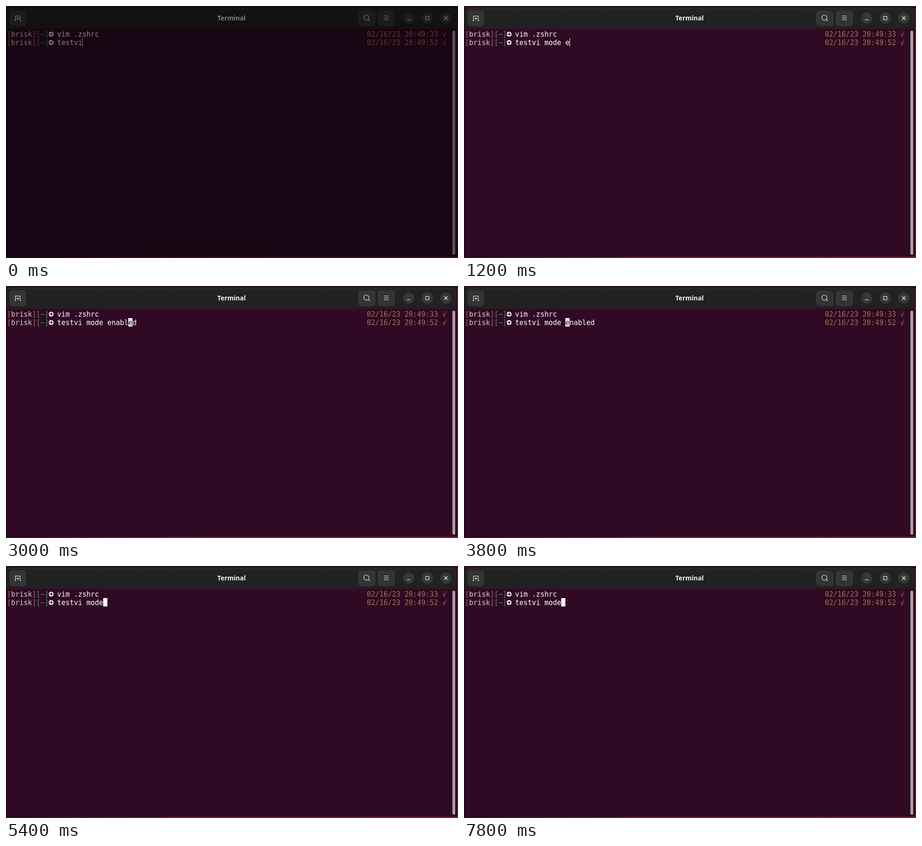
Animation of 972 by 542 pixels, one loop 8000 ms. Source, as an HTML page:

```html
<!DOCTYPE html>
<html lang="en">
<head>
<meta charset="utf-8">
<title>Terminal</title>
<style>
  html, body { margin: 0; width: 100%; height: 100%; overflow: hidden; background: #2c0a22; }
  svg { display: block; }
  .mono { font: 15px "DejaVu Sans Mono", monospace; letter-spacing: -0.03px; white-space: pre; }
  .title { font: bold 13.9px "Noto Sans", sans-serif; text-anchor: middle; }
  .button { fill: #343434; stroke: #3f3f3f; }
  .icon { fill: none; stroke: #f2f2f2; stroke-width: 1.1; }
  .path { fill: #26a269; }
  .user { fill: #d0cfcc; }
  .dim { fill: #a2734c; }
</style>
</head>
<body>
<svg width="972" height="542" viewBox="0 0 972 542">
  <defs>
    <linearGradient id="desk">
      <stop offset="0" stop-color="#3a0d30"/>
      <stop offset=".45" stop-color="#6a203f"/>
      <stop offset="1" stop-color="#7a2040"/>
    </linearGradient>
    <linearGradient id="bar" x2="0" y2="1">
      <stop offset="0" stop-color="#272727"/>
      <stop offset=".2" stop-color="#222"/>
      <stop offset="1" stop-color="#212121"/>
    </linearGradient>
    <g id="prompt">
      <text class="mono dim" x="2" y="66">[<tspan class="user">brisk</tspan>]<tspan class="path">[~]</tspan></text>
      <circle cx="97" cy="60.5" r="5.2" fill="#fff"/>
      <path d="M92.5 60.5H99M96.6 57.7L99.4 60.5L96.6 63.3" fill="none" stroke="#300a24" stroke-width="1.7"/>
    </g>
  </defs>

  <rect width="972" height="542" fill="url(#desk)"/>
  <rect width="972" height="6" fill="#350b2c"/>
  <path d="M0 539V12Q0 2 10 2H960Q970.5 2 970.5 12V539Z" fill="#12060f"/>
  <path d="M1 49V12Q1 3 10 3H960Q969.5 3 969.5 12V49Z" fill="url(#bar)"/>
  <path d="M10 3.5H960" stroke="#343434"/>
  <rect x="1" y="49" width="969" height="489" fill="#300a24"/>
  <rect x="960" y="53" width="6" height="482" rx="3" fill="#aaa1a7"/>

  <text class="title" x="485" y="31" fill="#f4f4f4">Terminal</text>

  <g class="button">
    <rect x="8.5" y="10.5" width="34" height="32" rx="5"/>
    <rect x="758.5" y="10.5" width="35" height="32" rx="5"/>
    <rect x="800.5" y="10.5" width="35" height="32" rx="5"/>
    <g stroke="none" fill="#373737">
      <circle cx="866" cy="26" r="12"/>
      <circle cx="906" cy="26" r="12"/>
      <circle cx="946" cy="26" r="12"/>
    </g>
  </g>
  <g class="icon">
    <path d="M18 31.5H20.5V21.5H30.5V31.5H33M25.5 24V30M22.5 27H28.5"/>
    <circle cx="775" cy="25" r="5.5"/>
    <path d="M779 29L782.5 32.5"/>
    <path d="M813 21.5H823M813 25.5H823M813 29.5H823"/>
    <path d="M862 29.5H870"/>
    <rect x="902.5" y="22.5" width="7" height="7"/>
    <path d="M942.3 22.3L949.7 29.7M949.7 22.3L942.3 29.7" stroke-width="1.4"/>
  </g>

  <use href="#prompt"/>
  <use href="#prompt" y="18"/>
  <g class="mono">
    <text class="dim" x="776" y="66">02/16/23 20:49:33 √</text>
    <text class="dim" x="776" y="84">02/16/23 20:49:52 √</text>
    <text x="110" y="66" fill="#fff">vim .zshrc</text>
    <text id="typed" x="110" y="84" fill="#fff"></text>
  </g>
  <rect id="cursor" y="69" height="18" fill="#fff"/>
  <text id="under" class="mono" y="84" fill="#300a24"></text>
  <rect id="shade" width="972" height="542" fill="#000" opacity=".48"/>
</svg>
<script>
const LOOP = 8000, CELL = 9, LEFT = 110;
const LINE = "testvi mode enabled";
const WIDTH = { beam: 1, block: CELL, off: 0 };

// start time, characters shown, cursor column, cursor style
const STEPS = [
  [0, 6, 6, "beam"],
  [400, 7, 7, "beam"],
  [600, 8, 8, "beam"],
  [800, 10, 10, "beam"],
  [1000, 12, 12, "beam"],
  [1200, 13, 13, "beam"],
  [1400, 14, 14, "beam"],
  [1600, 16, 16, "beam"],
  [1800, 18, 18, "beam"],
  [2000, 19, 19, "beam"],
  [3000, 19, 17, "block"],
  [3200, 19, 16, "block"],
  [3400, 19, 14, "block"],
  [3600, 19, 11, "block"],
  [3800, 19, 12, "block"],
  [4400, 12, 11, "block"],
  [5200, 12, 11, "off"],
  [5400, 12, 11, "block"],
  [6400, 12, 11, "off"],
  [6800, 12, 10, "block"],
  [7000, 12, 8, "block"],
  [7200, 12, 6, "block"],
  [7400, 12, 8, "block"],
  [7600, 12, 10, "block"],
  [7800, 12, 11, "block"]
];

const [typed, cursor, under, shade] =
  ["typed", "cursor", "under", "shade"].map(id => document.getElementById(id));

function draw(time) {
  const [, count, col, style] = STEPS.findLast(step => step[0] <= time);
  const text = LINE.slice(0, count);
  const x = LEFT + col * CELL;
  typed.textContent = text;
  cursor.setAttribute("x", x);
  cursor.setAttribute("width", WIDTH[style]);
  under.setAttribute("x", x);
  under.textContent = style === "block" ? text.charAt(col) : "";
  shade.style.display = time < 200 ? "" : "none";
}

const start = performance.now();
function tick() {
  draw((performance.now() - start) % LOOP);
  requestAnimationFrame(tick);
}
tick();
</script>
</body>
</html>
```
